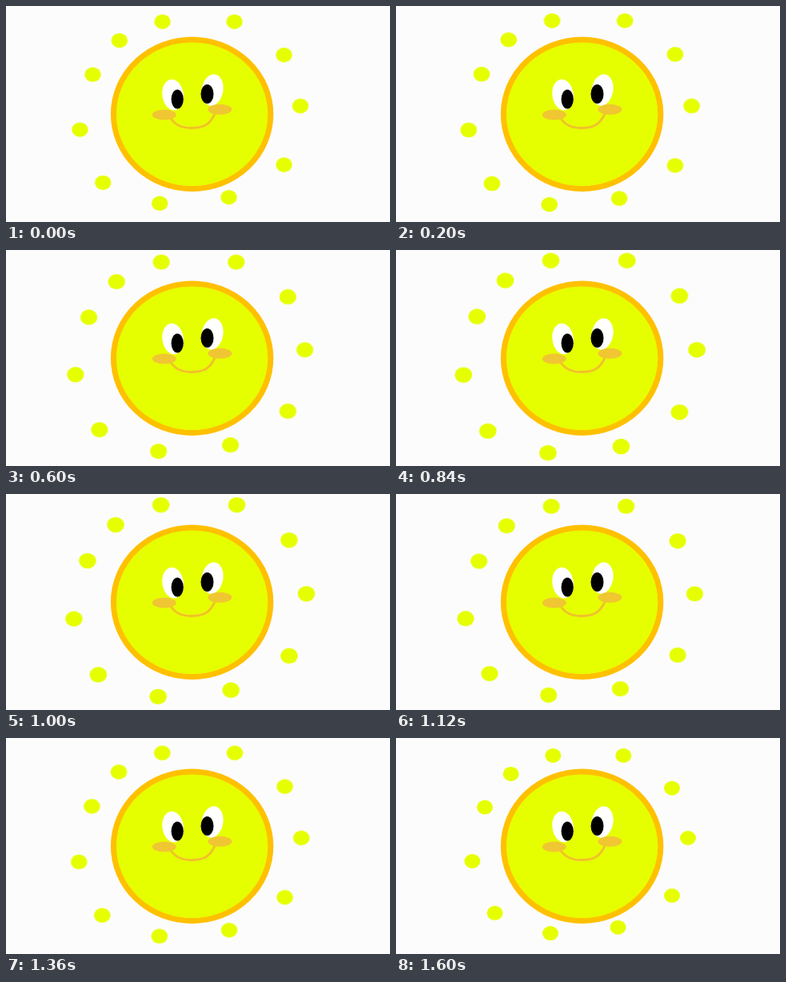
An HTML page for the animation above (2040 ms loop, 480 by 270 pixels).

```html
<!DOCTYPE html>
<html lang="en">
<head>
<meta charset="utf-8">
<title>Smiling sun</title>
<style>
  html, body { margin: 0; width: 100%; height: 100%; overflow: hidden; background: #fcfcfc; }
  svg { display: block; width: 100%; height: 100%; }
  .rays {
    fill: #e6ff00;
    transform-origin: 230.3px 127.5px;
    animation: pulse 2040ms infinite;
  }
  /* slow swell, quicker shrink, then a rest; moves every 40 ms */
  @keyframes pulse {
    0% { transform: scale(1.022); animation-timing-function: step-end; }
    1.96078% { transform: scale(1.022); animation-timing-function: steps(22, end); }
    45.09804% { transform: scale(1.088); animation-timing-function: steps(17, end); }
    78.43137%, 100% { transform: scale(1); }
  }
</style>
</head>
<body>
<svg viewBox="0 0 480 270">
  <defs><ellipse id="ray" rx="10" ry="9"/></defs>
  <g class="rays">
    <use href="#ray" x="196.3" y="21.9"/>
    <use href="#ray" x="284.3" y="21.9"/>
    <use href="#ray" x="345" y="62.7"/>
    <use href="#ray" x="365" y="125"/>
    <use href="#ray" x="345" y="197"/>
    <use href="#ray" x="277.5" y="236.7"/>
    <use href="#ray" x="193" y="244.1"/>
    <use href="#ray" x="123.6" y="218.8"/>
    <use href="#ray" x="95.4" y="154"/>
    <use href="#ray" x="111.1" y="86.6"/>
    <use href="#ray" x="143.7" y="44.9"/>
  </g>
  <ellipse cx="232.6" cy="135.2" rx="98.2" ry="93.3" fill="#e6ff00" stroke="#ffc000" stroke-width="7"/>
  <g fill="#fff">
    <ellipse cx="208.6" cy="111" rx="13.2" ry="19.4" transform="rotate(-8 208.6 111)"/>
    <ellipse cx="258" cy="105" rx="13.4" ry="19.8" transform="rotate(10 258 105)"/>
  </g>
  <ellipse cx="214.2" cy="116.4" rx="7.6" ry="12"/>
  <ellipse cx="251.5" cy="110" rx="8" ry="12"/>
  <path d="M204 138C210 147 217 152.5 231 152.5C247 152.5 254 149 261 135" fill="none" stroke="#f2c02c" stroke-width="2.8"/>
  <g fill="#f0c632">
    <ellipse cx="197.8" cy="136" rx="15" ry="6.5"/>
    <ellipse cx="267.4" cy="129.3" rx="15" ry="6.5"/>
  </g>
</svg>
</body>
</html>
```
